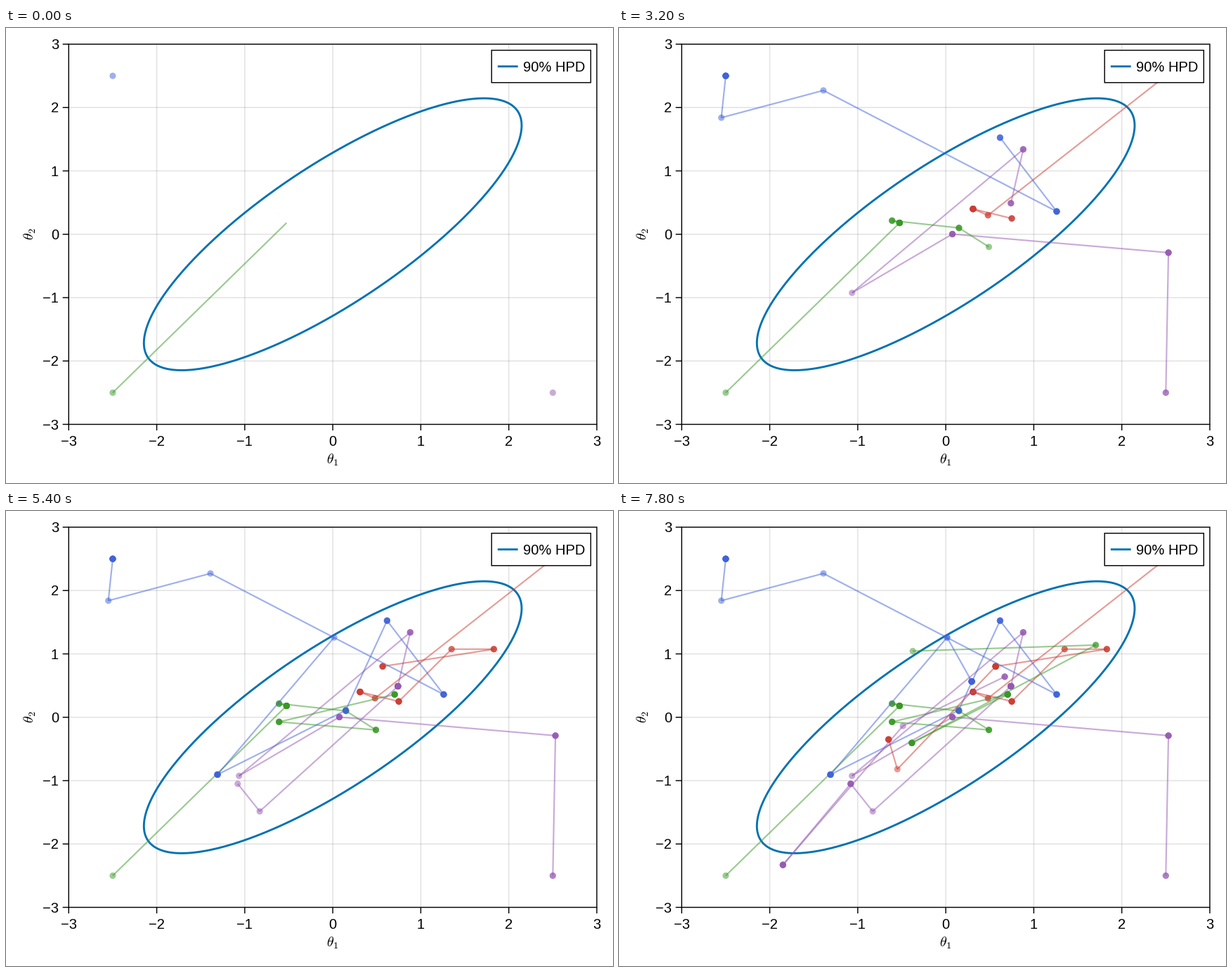
Write a matplotlib script that moves like this. It is 864x648 px and loops after 8000 ms.

```python
import numpy as np
import matplotlib.pyplot as plt
from matplotlib.animation import FuncAnimation
from matplotlib.patches import Circle, Rectangle

W, H, DPI = 864, 648, 100
FRAMES, STEP_MS = 40, 200
PT = 72 / DPI          # points per pixel
UNIT = 1.44            # pixels per drawing unit
LEFT, RIGHT, TOP, BOTTOM = (UNIT * v for v in (62, 584, 16, 392))
FONT = 14 * UNIT * PT
START = 2.5            # every chain starts in a corner at this distance

plt.rcParams["font.family"] = "Liberation Sans"
plt.rcParams["mathtext.fontset"] = "cm"
plt.rcParams["path.snap"] = False


def chain(sx, sy, wait, *moves):
    """Sampler path: a corner held for `wait` steps, then accepted moves
    (x, y, hold). The hold is 1 if left out; the last move lasts to the end."""
    path = [(sx * START, sy * START)] * wait
    for x, y, *hold in moves:
        path += [(x, y)] * (hold[0] if hold else 1)
    return path + path[-1:] * (FRAMES + 1 - len(path))


CHAINS = {
    "#4063D8": chain(-1, 1, 7, (-2.55, 1.84), (-1.39, 2.27), (1.26, .36, 5),
                     (.617, 1.525, 4), (.147, .11, 3), (-1.31, -.905, 6),
                     (.015, 1.26, 2), (.295, .565)),
    "#CB3C33": chain(1, 1, 2, (.48, .3, 2), (.31, .4, 10), (.75, .25, 5),
                     (1.35, 1.075, 2), (1.83, 1.075, 3), (.567, .803, 10),
                     (-.55, -.82), (-.65, -.35)),
    "#389826": chain(-1, -1, 1, (-.525, .18, 9), (-.61, .215, 3),
                     (.15, .1, 3), (.49, -.2, 3), (-.61, -.073, 4),
                     (.703, .36, 8), (-.385, -.405, 6), (1.704, 1.14, 2),
                     (-.375, 1.045)),
    "#9558B2": chain(1, -1, 2, (2.53, -.29, 4), (.075, .003, 4),
                     (-1.065, -.925), (.88, 1.34, 3), (.74, .49, 12),
                     (-.83, -1.485), (-1.08, -1.05, 4), (-1.85, -2.33, 5),
                     (-.487, -.137), (.67, .64)),
}


def px(x):
    return LEFT + (np.asarray(x) + 3) / 6 * (RIGHT - LEFT)


def py(y):
    return BOTTOM - (np.asarray(y) + 3) / 6 * (BOTTOM - TOP)


fig = plt.figure(figsize=(W / DPI, H / DPI), dpi=DPI, facecolor="white")
ax = fig.add_axes([0, 0, 1, 1])
ax.set_xlim(0, W)
ax.set_ylim(H, 0)
ax.axis("off")


def line(xs, ys, color, width, z, alpha=1):
    return ax.plot(xs, ys, color=color, lw=width * UNIT * PT, zorder=z,
                   alpha=alpha, solid_capstyle="butt")[0]


def dot(x, y, color, z):
    return ax.add_patch(Circle((x, y), 4.57, fc=color, lw=0, alpha=0.5,
                               zorder=z))


def label(x, y, s, ha="center", va="baseline", **kw):
    ax.text(x, y, s, fontsize=FONT, color="black", ha=ha, va=va,
            zorder=2000, **kw)


def box(x0, y0, x1, y1, z, fill):
    ax.add_patch(Rectangle((x0, y0), x1 - x0, y1 - y0, fc=fill, ec="black",
                           lw=UNIT * PT, zorder=z, joinstyle="miter"))


def draw_axes():
    tick = 6 * UNIT
    for v in range(-3, 4):
        x, y = px(v), py(v)
        if abs(v) < 3:
            line([x, x], [TOP, BOTTOM], "black", 1, 1, 0.12)
            line([LEFT, RIGHT], [y, y], "black", 1, 1, 0.12)
        line([x, x], [BOTTOM, BOTTOM + tick], "black", 1, 1000)
        line([LEFT - tick, LEFT], [y, y], "black", 1, 1000)
        name = str(v).replace("-", "\u2212")
        label(x, 595, name)
        label(75, y + 7.2, name, ha="right")
    box(LEFT, TOP, RIGHT, BOTTOM, 1000, "none")
    label(465, 615.5, r"$\theta_1$", va="center")
    label(34.5, 293.5, r"$\theta_2$", va="center", rotation=90)


def draw_region(rho=0.8, mass=0.9):
    r = np.sqrt(-2 * np.log(1 - mass))
    t = np.linspace(0, 2 * np.pi, 400)
    x = r * np.cos(t)
    y = r * (rho * np.cos(t) + np.sqrt(1 - rho**2) * np.sin(t))
    line(px(x), py(y), "#0072B2", 2, 2)


def draw_legend():
    x0, y0, x1, y1 = (UNIT * v for v in (480, 22, 578, 54))
    mid = (y0 + y1) / 2
    box(x0, y0, x1, y1, 1500, "white")
    line([x0 + 6 * UNIT, x0 + 26 * UNIT], [mid, mid], "#0072B2", 2, 1600)
    label(x0 + 31 * UNIT, mid + 7.2, "90% HPD", ha="left")


def draw_step(i):
    """Dot at every chain's current sample, line to its next one."""
    group = []
    for k, (color, path) in enumerate(CHAINS.items()):
        z = 10 + 8 * i + 2 * k
        (x0, x1), (y0, y1) = zip(*path[i:i + 2])
        group.append(dot(px(x0), py(y0), color, z))
        if path[i] != path[i + 1]:
            group.append(line(px([x0, x1]), py([y0, y1]), color, 1.5,
                              z + 1, 0.5))
    return group


draw_axes()
draw_region()
draw_legend()
steps = [draw_step(i) for i in range(FRAMES)]


def update(frame):
    for i, group in enumerate(steps):
        for artist in group:
            artist.set_visible(i <= frame)
    return []


anim = FuncAnimation(fig, update, frames=FRAMES, init_func=lambda: update(0),
                     interval=STEP_MS, repeat=True, repeat_delay=0, blit=False)
plt.show()
```
